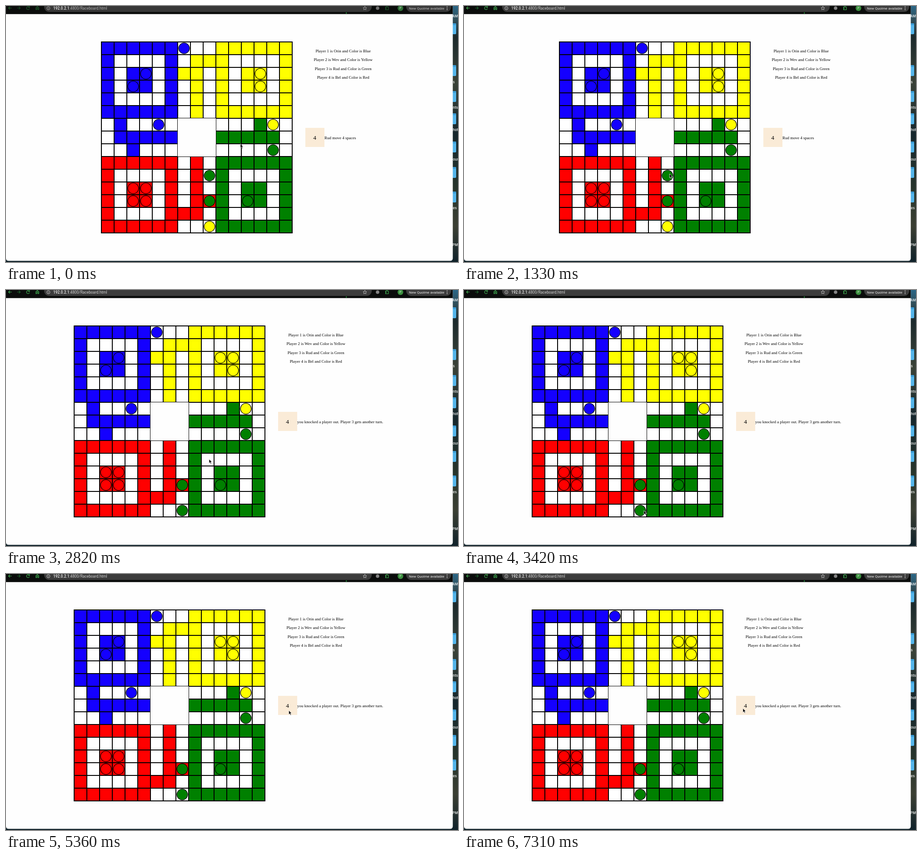
Recreate the animation shown at these times as an HTML page. Size 995 by 563 pixels, loop 8000 ms.

```html
<!DOCTYPE html>
<html lang="en">
<head>
<meta charset="utf-8">
<title>Board game</title>
<style>
  html, body { margin: 0; width: 100%; height: 100%; overflow: hidden; background: #fff; }
  svg { display: block; width: 100%; height: 100%; }
  .page { font: 8.96px "Liberation Serif", serif; fill: #000; }
  .ui { font-family: Roboto, sans-serif; }
  .label { font: 500 7.5px Inter, sans-serif; fill: #fff; }
</style>
</head>
<body>
<svg id="stage" viewBox="0 0 995 563" preserveAspectRatio="none">
  <defs>
    <linearGradient id="wall" x2="0" y2="1">
      <stop offset="0" stop-color="#2b6787"/>
      <stop offset=".05" stop-color="#31505c"/>
      <stop offset=".12" stop-color="#1c2a2c"/>
      <stop offset=".3" stop-color="#3a4238"/>
      <stop offset=".5" stop-color="#16272d"/>
      <stop offset=".72" stop-color="#28352c"/>
      <stop offset=".86" stop-color="#3b3f33"/>
      <stop offset="1" stop-color="#10222a"/>
    </linearGradient>
  </defs>
  <rect width="995" height="563" fill="url(#wall)"/>
  <g id="desk"></g>
  <path d="M0 0H983.5V554.5Q983.5 560.5 977.5 560.5H6Q0 560.5 0 554.5Z" fill="#fefefe"/>
  <g id="bar" class="ui"></g>
  <g id="game" class="page"></g>
  <path id="cursor" d="M0 0V9L2.1 7.1L3.7 10.6L5.2 9.9L3.7 6.5H6.4Z" fill="#000" stroke="#fff" stroke-width=".7"/>
</svg>
<script>
const LOOP = 8000, TICK = 149.1, CELL = 28, LEFT = 210, TOP = 79;
const $ = id => document.getElementById(id);
const rect = (x, y, w, h, fill, r = 0) =>
  `<rect x="${x}" y="${y}" width="${w}" height="${h}" rx="${r}" fill="${fill}"/>`;
const disc = (x, y, r, fill, more = '') => `<circle cx="${x}" cy="${y}" r="${r}" fill="${fill}" ${more}/>`;
const text = (x, y, str, more = '') => `<text x="${x}" y="${y}" ${more}>${str}</text>`;
const line = (d, color, w = 1.1) => `<path d="${d}" fill="none" stroke="${color}" stroke-width="${w}"/>`;

const COLORS = { B: '#1400ff', Y: '#ffff00', G: '#008000', R: '#ff0000', '.': '#fff' };
const MAP = [
  'BBBBBB...YYYYYY',
  'B....B.YYY....Y',
  'B.BB.BYY.Y.YY.Y',
  'B.BB.B.Y.Y.YY.Y',
  'B....B.Y.Y....Y',
  'BBBBBB.Y.YYYYYY',
  '.B....   ...G..',
  '.BBBBB   GGGGG.',
  '..B...   ......',
  'RRRRRR.R.GGGGGG',
  'R....R.R.G....G',
  'R.RR.R.R.G.GG.G',
  'R.RR.R.RRG.GG.G',
  'R....RRR.G....G',
  'RRRRRR...GGGGGG'
];

// Pieces as [column, row].
const FIXED = {
  B: [[6, 0], [3, 2], [2, 3], [4, 6]],
  Y: [[12, 2], [12, 3], [13, 6]],
  G: [[13, 8], [8, 12], [11, 12]],
  R: [[2, 11], [3, 11], [2, 12], [3, 12]]
};
const BEFORE = { Y: [[8, 14]], G: [[8, 10]] };
const AFTER = { Y: [[11, 2]], G: [[8, 14]] };

const PLAYERS = ['Orin and Color is Blue', 'Wev and Color is Yellow', 'Rud and Color is Green', 'Bel and Color is Red'];

// Cursor path as [tick, x, y]; the pose is sampled on whole ticks.
const PATH = [
  [0, 516, 303], [1, 503, 318], [2, 478, 345], [3, 458, 365], [4, 452, 370], [6, 452, 370],
  [7, 452.5, 369], [10, 452.5, 369], [11, 451, 390], [13, 449, 468], [14, 449, 460],
  [16, 447, 364], [17, 447, 372], [19, 447, 372], [20, 435, 400], [22, 394, 494],
  [23, 396, 485], [24, 425, 400], [25, 461, 281], [26, 470, 190], [27, 479, 151],
  [28, 503.5, 178], [30, 515, 190], [32, 570, 262], [33, 589, 282], [34, 606, 294],
  [36, 622.5, 300], [37, 645, 301], [40, 759, 300], [42, 819, 293], [43, 819, 293],
  [44, 790, 294], [46, 640, 286], [47, 592, 282], [48, 601, 290], [49, 614, 295.5], [60, 614, 295.5]
];

function drawPieces(set) {
  return Object.entries(set).map(([key, spots]) => spots.map(([c, r]) =>
    disc(LEFT + (c + .5) * CELL, TOP + (r + .5) * CELL, 11.8, COLORS[key], 'stroke="#000" stroke-width="1.3"')
  ).join('')).join('');
}

function drawGame() {
  const size = CELL * 15;
  let out = rect(LEFT - 1, TOP - 1, size + 2, size + 2, '#000');
  MAP.forEach((row, r) => [...row].forEach((key, c) => {
    if (key !== ' ') out += rect(LEFT + c * CELL + 1, TOP + r * CELL + 1, CELL - 2, CELL - 2, COLORS[key]);
  }));
  out += rect(LEFT + 6 * CELL, TOP + 6 * CELL, 3 * CELL, 3 * CELL, '#fefefe');
  out += drawPieces(FIXED);
  PLAYERS.forEach((p, i) => {
    out += text(742.2, 102 + i * 19.35, `Player ${i + 1} is ${p}`, 'text-anchor="middle"');
  });
  out += rect(659, 268, 42, 42, '#faebd7') + text(679.6, 294, 4, 'text-anchor="middle" font-size="13.44"');
  out += `<g id="before">${drawPieces(BEFORE)}${text(701, 292.5, 'Rud move 4 spaces')}</g>`;
  out += `<g id="after">${drawPieces(AFTER)}${text(701, 292.5, 'you knocked a player out. Player 3 gets another turn.')}</g>`;
  return out;
}

function drawBar(active) {
  const green = active ? '#43b554' : '#1d5f2b';
  const faint = active ? '#1f6a30' : '#174a23';
  const grey = active ? '#d5d5d5' : '#b5b5b5';
  const pill = active ? '#3c3c3c' : '#383838';
  return rect(0, 0, 983.5, 17.8, '#0b0d0c') +
    rect(84, -10, 721, 23, pill, 11) + rect(881, -10, 99, 23, pill, 11) +
    line('M12.5 4.5H5.5M8.7 1.3L5.5 4.5L8.7 7.7', green) +
    line('M24.5 4.5H31.5M28.3 1.3L31.5 4.5L28.3 7.7', faint) +
    line('M51 2.6A3.3 3.3 0 1 0 51.6 5.6M51.8 .6V3.2H49.2', green) +
    line('M65.8 8V3.8L69 1.2L72.2 3.8V8H70.2V5.4H67.8V8Z', green) +
    disc(93.3, 4.8, 3.5, 'none', `stroke="${grey}" stroke-width=".9"`) +
    line('M93.3 4.3V6.8M93.3 2.6V3.5', grey, .9) +
    text(104, 7.6, `<tspan fill="#f4f4f4" font-weight="500">192.0.2.1</tspan>:4800/Raceboard.html`, `font-size="8.35" fill="${grey}"`) +
    line('M790 .8L791.2 3.5L794 3.8L791.9 5.7L792.5 8.5L790 7L787.5 8.5L788.1 5.7L786 3.8L788.8 3.5Z', grey, .8) +
    disc(818, 4.8, 3.8, active ? '#858585' : '#707070') +
    line('M835.5 2.3H837.5V1.2H839.5V2.3H841.8V8.3H835.5V6.4H836.6V4.4H835.5Z', green) +
    disc(868.3, 4.8, 6.2, active ? '#3b8f3f' : '#2f6f36') +
    text(868.3, 7.4, 'P', 'text-anchor="middle" font-size="7" fill="#d8ecd5"') +
    text(887, 7.5, 'New Quolme available', `font-size="7.9" fill="${active ? '#eee' : '#c4c4c4'}"`) +
    [1.6, 4.8, 8].map(y => disc(971, y, .9, '#ddd')).join('') +
    rect(748.3, 14, 1.8, 3, '#23913a');
}

function drawDesk() {
  const folders = [38, 130, 187, 236, 298, 354, 408];
  const labels = [['AM', 25], ['s', 170], ['nts', 226], ['hot', 275], ['ous', 340], ['es', 447], ['PM', 528]];
  return folders.map(y => rect(970, y, 21, 24, '#54b5ea', 2) + rect(970, y, 21, 4, '#3a9bd4', 2)).join('') +
    labels.map(([s, y]) => text(s === 'AM' || s === 'PM' ? 994.5 : 983.8, y, s,
      `class="label" ${/M/.test(s) ? 'text-anchor="end"' : ''}`)).join('');
}

function cursorAt(tick) {
  const i = PATH.findIndex(p => p[0] > tick);
  const [a, b] = [PATH[i - 1], PATH[i]];
  const k = (tick - a[0]) / (b[0] - a[0]);
  return [1, 2].map(n => a[n] + (b[n] - a[n]) * k);
}

$('desk').innerHTML = drawDesk();
$('bar').innerHTML = `<g id="idle">${drawBar(false)}</g><g id="active">${drawBar(true)}</g>`;
$('game').innerHTML = drawGame();

const show = (id, on) => $(id).setAttribute('visibility', on ? 'visible' : 'hidden');

function render() {
  const tick = Math.floor((performance.now() % LOOP + 14) / TICK);
  const focused = tick >= 9, moved = tick >= 19;
  show('idle', !focused);
  show('active', focused);
  show('before', !moved);
  show('after', moved);
  $('game').setAttribute('transform', `translate(${moved ? -60 : 0} 0)`);
  $('cursor').setAttribute('transform', `translate(${cursorAt(tick)})`);
  requestAnimationFrame(render);
}
render();
</script>
</body>
</html>
```
